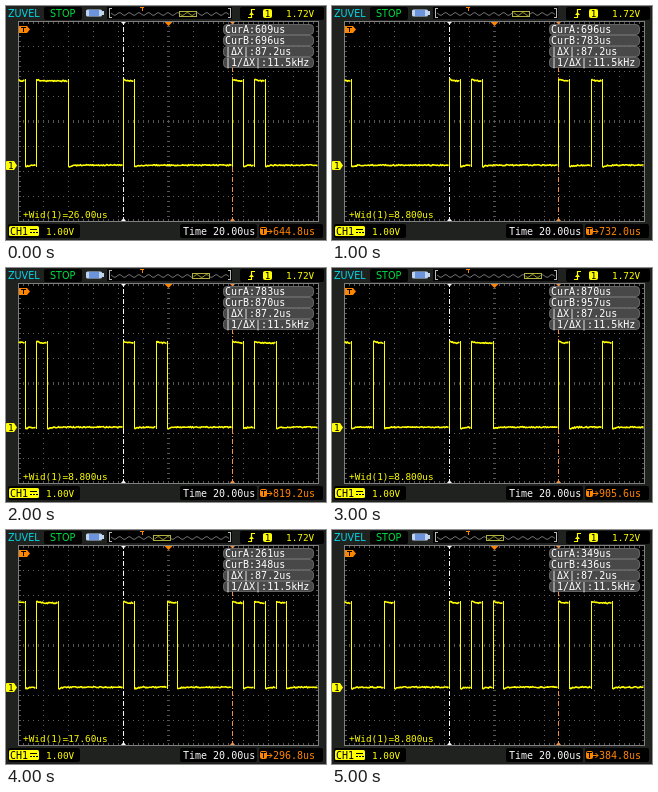
Animation of 320x234 px, one loop 6000 ms. Source, as an HTML page:

```html
<!DOCTYPE html>
<html lang="en">
<head>
<meta charset="utf-8">
<title>Oscilloscope</title>
<style>
  html, body { margin: 0; width: 100%; height: 100%; overflow: hidden; background: #202220; }
  svg { display: block; width: 320px; height: 234px; }
  text { font: 10px "DejaVu Sans Mono", monospace; white-space: pre; }
  .small { font-size: 9.4px; }
  .sans { font: 9.6px "DejaVu Sans", sans-serif; }
  .crisp { shape-rendering: crispEdges; }
</style>
</head>
<body>
<svg id="scope" viewBox="0 0 320 234"></svg>
<script>
const NS = "http://www.w3.org/2000/svg";
const scope = document.getElementById("scope");
const YELLOW = "#ffff00", ORANGE = "#ff8400", WHITE = "#f8f8f8";

function add(tag, attrs, content) {
  const el = document.createElementNS(NS, tag);
  for (const key in attrs) el.setAttribute(key, attrs[key]);
  if (content !== undefined) el.textContent = content;
  return scope.appendChild(el);
}
const rect = (x, y, width, height, fill, rx = 0, more = {}) =>
  add("rect", { x, y, width, height, fill, rx, ...more });
const line = (d, stroke, more = {}) =>
  add("path", { d, stroke, fill: "none", "stroke-width": 1, ...more });
const shape = (d, fill) => add("path", { d, fill });
const label = (x, y, fill, str, cls = "") => add("text", { x, y, fill, class: cls }, str);

// Each screen shows three serial words; a word carries three bits, lowest first.
const screens = [
  { a: 609, b: 696, width: "26.00", offset: "644.8", words: [7, 0, 1] },
  { a: 696, b: 783, width: "8.800", offset: "732.0", words: [0, 1, 2] },
  { a: 783, b: 870, width: "8.800", offset: "819.2", words: [1, 2, 3] },
  { a: 870, b: 957, width: "8.800", offset: "905.6", words: [2, 3, 4] },
  { a: 261, b: 348, width: "17.60", offset: "296.8", words: [3, 4, 5], rise: 2 },
  { a: 349, b: 436, width: "8.800", offset: "384.8", words: [4, 5, 6], rise: 2 }
];

// Header
label(2, 11, "#00d8e8", "ZUVEL", "sans");
rect(38, 1, 38, 13, "#000", 2);
label(44, 11, "#00e040", "STOP", "sans");
rect(80, 3.5, 16, 7, "#c0d4f0", 1.5);
rect(83, 4, 10, 6, "#6c94dc");
rect(96, 5, 2, 4, "#c0d4f0");
rect(101, 1, 125, 12, "#000");
line("M106 2.5H103.5V11.5H106M222 2.5H224.5V11.5H222", "#b8b8b8", { class: "crisp" });

function ripple(from, to) {
  let d = "";
  for (let x = from; x <= to; x++)
    d += (d ? "L" : "M") + x + " " + (8 + 1.3 * Math.sin(x * 0.65)).toFixed(1);
  return d;
}
line(ripple(105, 223), "#909090", { "stroke-width": 0.8 });
line("M134 1.5H138M136 1.5V5", ORANGE, { class: "crisp" });
const view = rect(174, 5.5, 17, 5, "#000", 0, { stroke: "#b0b040", "stroke-width": 1 });
const viewWave = line("", "#e0e040", { "stroke-width": 0.8 });

rect(234, 1, 84, 13, "#000", 2);
line("M242 11.5H245.5V3.5H249", YELLOW, { "stroke-width": 1.2 });
shape("M243 9L245.5 6L248 9Z", YELLOW);
rect(257, 3, 9, 9, YELLOW, 2);
label(258.8, 11, "#000", "1", "small");
label(280, 11, YELLOW, "1.72V", "small");

// Graticule
rect(12, 15, 301, 201, "#000");
let dots = "", ticks = "";
for (let i = 1; i < 12; i++) if (i !== 6) dots += `M${12.5 + i * 25} 15V215`;
for (let i = 1; i < 8; i++) if (i !== 4) dots += `M12 ${15.5 + i * 25}H312`;
for (let x = 17; x < 312; x += 5) ticks += `M${x}.5 16v2M${x}.5 213v2M${x}.5 114v3`;
for (let y = 20; y < 215; y += 5) ticks += `M13 ${y}.5h2M310 ${y}.5h2M161 ${y}.5h3`;
line(dots, "#606060", { "stroke-dasharray": "1 4", class: "crisp" });
line(ticks, "#555", { class: "crisp" });
line("M12.5 15.5H312.5V215.5H12.5Z", "#808080", { class: "crisp" });
shape("M158.5 16H166.5L162.5 20Z", ORANGE);
shape("M13 20H21L24 23.5L21 27H13Z", ORANGE);
line("M15 21.5H20M17.5 21.5V26", "#000", { class: "crisp" });

// Cursors
function cursor(x, color) {
  line(`M${x}.5 16V215`, color,
    { "stroke-dasharray": "5 2 1 2", "stroke-dashoffset": 5, class: "crisp" });
  shape(`M${x - 2} 16H${x + 3}L${x + 0.5} 18.5Z`, color);
  shape(`M${x - 2} 215H${x + 3}L${x + 0.5} 212Z`, color);
}
cursor(117, WHITE);
cursor(226, "#f09040");

const levels = line("", YELLOW, { "stroke-width": 1.6 });
const edges = line("", YELLOW, { class: "crisp" });

// Channel marker
const marker = add("g", {});
marker.append(
  shape("M1 155H8L11 159.5L8 164H1Q0 164 0 163V156Q0 155 1 155Z", YELLOW),
  label(2, 163, "#000", "1", "small")
);

// Cursor readings
const readings = [0, 1, 2, 3].map(i => {
  const y = 18.5 + i * 11;
  rect(217.5, y, 90, 10, "#484848", 3.5, { stroke: "#747474", "stroke-width": 0.8 });
  return label(219, y + 8.7, "#fff", ["", "", "|ΔX|:87.2us", "|1/ΔX|:11.5kHz"][i]);
});
const widthText = label(17, 212, YELLOW, "", "small");

// Footer
rect(2, 218, 72, 14, "#000", 2);
rect(3, 220, 30, 10, YELLOW, 1.5);
label(4, 229, "#000", "CH1");
line("M24 223.5H31M24 226.5h2m1 0h2m1 0h2", "#000", { class: "crisp" });
label(40, 229, YELLOW, "1.00V", "small");
rect(174, 218, 77, 14, "#000", 2);
label(177, 229, WHITE, "Time 20.00us");
rect(253, 218, 64, 14, "#000", 2);
rect(254, 221, 7, 8, ORANGE, 2);
line("M255 222.5H260M257.5 222.5V228", "#000", { class: "crisp" });
line("M261 225.5H266M263.5 223L266 225.5L263.5 228", ORANGE);
const offsetText = label(267, 229, ORANGE, "");

const noise = n => {
  const v = Math.sin(n * 127.1) * 43758.5453;
  return v - Math.floor(v) - 0.5;
};

function isHigh(x, words) {
  const first = 8.5, period = 109, bit = 10.8;
  if (x < first) return true;
  const word = Math.floor((x - first) / period);
  const slot = Math.floor((x - first - word * period) / bit);
  return slot === 0 || (slot > 1 && slot < 5 && (words[word] >> (slot - 2) & 1) === 1);
}

function drawWave({ words, rise = 0 }, seed) {
  let flat = "", jumps = "", last, since = 2;
  for (let x = 12.5; x < 312; x++) {
    const high = isHigh(x, words), turn = high !== last;
    if (turn && last !== undefined) {
      jumps += `M${x} ${73 - rise}V${161 - rise}`;
      since = 0;
    }
    const ring = 1.8 * Math.exp(-since / 3) * (high ? -1 : 1);
    const y = (high ? 75 : 159.2) - rise + ring + noise(x + seed * 311) * 1.1;
    flat += `${turn ? "M" : "L"}${x} ${y.toFixed(1)}`;
    last = high;
    since++;
  }
  levels.setAttribute("d", flat);
  edges.setAttribute("d", jumps);
}

let shown = -1;
function render(ms) {
  const index = Math.floor(ms / 1000) % screens.length;
  if (index === shown) return;
  shown = index;
  const s = screens[index];
  const left = Math.round(173 + (s.offset - 644.8) * 0.0747) + 0.5;
  view.setAttribute("x", left);
  viewWave.setAttribute("d", ripple(left + 1, left + 16));
  drawWave(s, index);
  marker.setAttribute("transform", `translate(0 ${-(s.rise || 0)})`);
  readings[0].textContent = `CurA:${s.a}us`;
  readings[1].textContent = `CurB:${s.b}us`;
  widthText.textContent = `+Wid(1)=${s.width}us`;
  offsetText.textContent = `${s.offset}us`;
}

const start = performance.now();
function tick() {
  render(performance.now() - start);
  requestAnimationFrame(tick);
}
tick();
</script>
</body>
</html>
```
